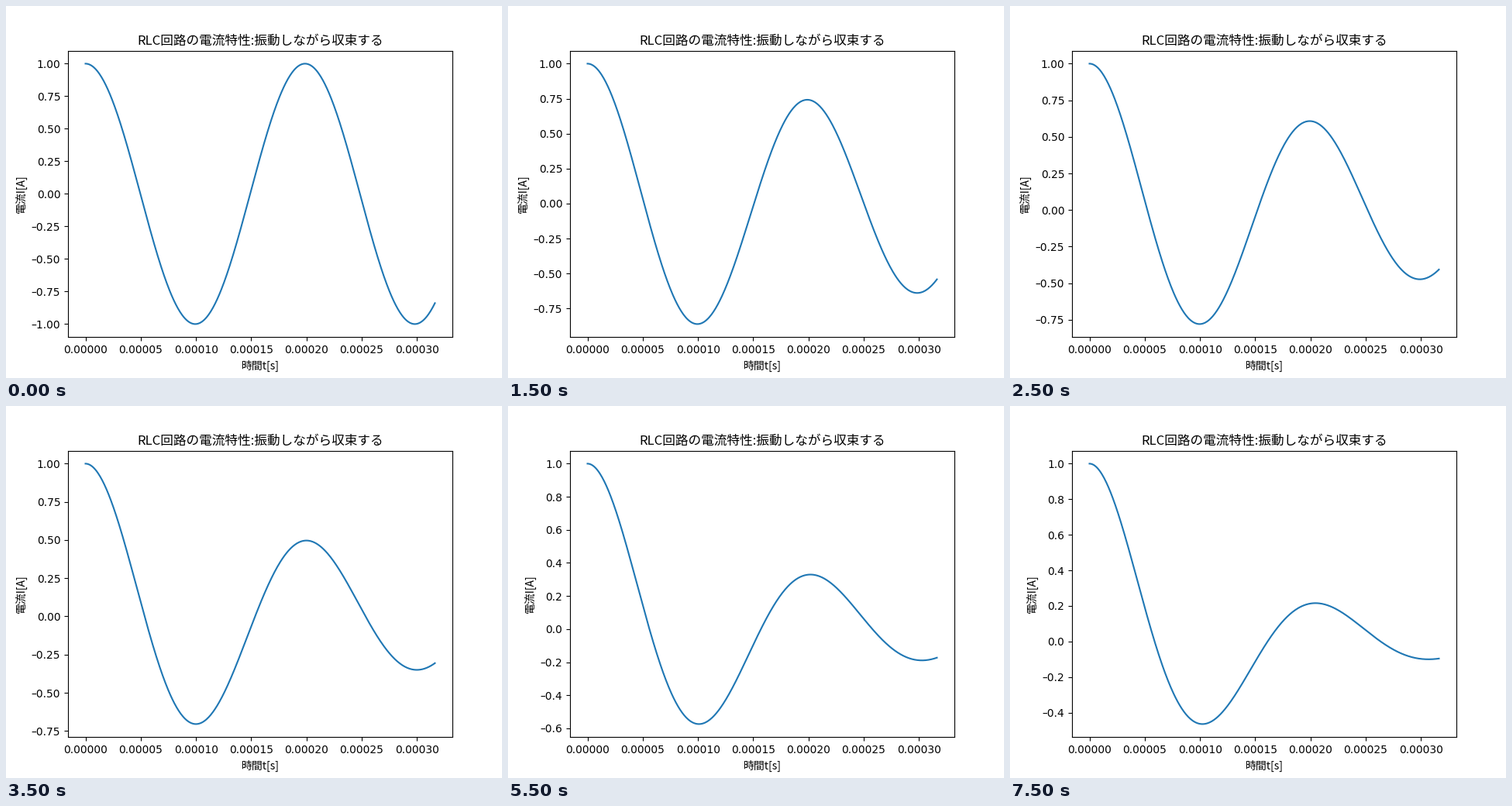
A matplotlib script that plays this animation: 640x480 px, repeating every 8000 ms.

```python
import numpy as np
import matplotlib.pyplot as plt
from matplotlib.animation import FuncAnimation
from matplotlib.ticker import ScalarFormatter

L = 1e-3   # inductance [H]
C = 1e-6   # capacitance [F]
FRAMES = 16
INTERVAL = 500
JP = "Noto Sans CJK JP"


class ShortMinus(ScalarFormatter):
    """Tick labels with a narrow minus sign."""

    @staticmethod
    def fix_minus(s):
        return s.replace("-", "\u2013")


def current(t, r):
    """Underdamped series RLC current with I(0) = 1 and I'(0) = 0."""
    gamma = r / (2 * L)
    omega = np.sqrt(1 / (L * C) - gamma ** 2)
    wave = np.cos(omega * t) + gamma / omega * np.sin(omega * t)
    return np.exp(-gamma * t) * wave


plt.rcParams["font.family"] = "DejaVu Sans"
fig, ax = plt.subplots(figsize=(6.4, 4.8), dpi=100)
t = np.linspace(0, 10 * np.sqrt(L * C), 500)
line, = ax.plot(t, current(t, 0), color="#1f77b4", lw=1.5)

ax.set_title("RLC回路の電流特性:振動しながら収束する", family=JP)
ax.set_xlabel("時間t[s]", family=JP)
ax.set_ylabel("電流I[A]", family=JP)
ax.yaxis.set_major_formatter(ShortMinus())


def update(r):
    # The resistance grows by one ohm per step.
    line.set_ydata(current(t, r))
    ax.relim()
    ax.autoscale_view()
    return line,


anim = FuncAnimation(fig, update, frames=FRAMES, interval=INTERVAL,
                     init_func=lambda: update(0), repeat=True, repeat_delay=0)
plt.show()
```
